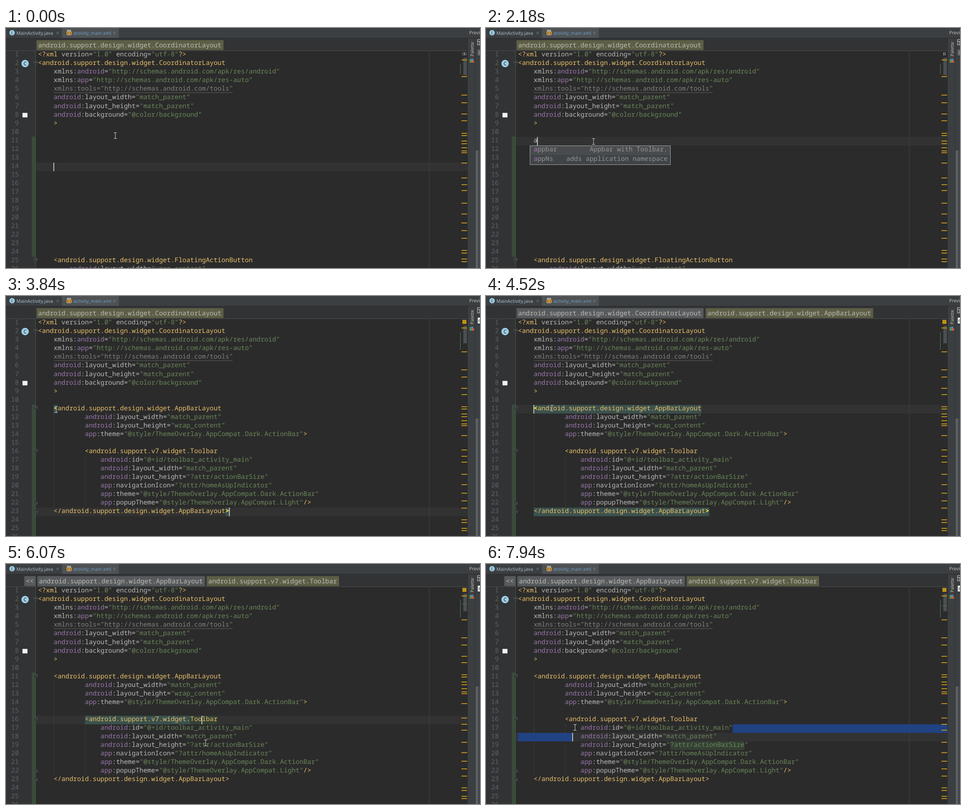
An HTML page with a canvas for the animation above (8000 ms loop, 1050 by 533 pixels).

```html
<!DOCTYPE html>
<html lang="en">
<head>
<meta charset="utf-8">
<title>Editor live template</title>
<style>
  html, body { margin: 0; width: 100%; height: 100%; overflow: hidden; background: #2b2b2b; }
  canvas { display: block; }
</style>
</head>
<body>
<canvas id="stage" width="1050" height="533"></canvas>
<script>
const ctx = document.getElementById('stage').getContext('2d');
const W = 1050, H = 533, LOOP = 8000;
const LEFT = 71, TOP = 51, CELL = 8.645, ROW = 19.05, BASE = 12.2;
const MONO = '14.41px "Noto Sans Mono", monospace';
const UI = '10.4px "Noto Sans", sans-serif';
const SIDE = '9.8px "Noto Sans", sans-serif';
const TAG = '#e8bf6a', NS = '#9876aa', ATTR = '#bababa', STR = '#6a8759', DIM = '#808080';
const TEAL = '#3b514d', USAGE = '#344134', YELLOW = '#be9117';

const head = [
  '<?xml version="1.0" encoding="utf-8"?>',
  '<android.support.design.widget.CoordinatorLayout',
  '    xmlns:android="http://schemas.android.com/apk/res/android"',
  '    xmlns:app="http://schemas.android.com/apk/res-auto"',
  '    xmlns:tools="http://schemas.android.com/tools"',
  '    android:layout_width="match_parent"',
  '    android:layout_height="match_parent"',
  '    android:background="@color/background"',
  '    >',
  ''
];
const before = [...head, ...Array(14).fill(''),
  '    <android.support.design.widget.FloatingActionButton',
  '        android:layout_width="wrap_content"'
];
const after = [...head,
  '    <android.support.design.widget.AppBarLayout',
  '            android:layout_width="match_parent"',
  '            android:layout_height="wrap_content"',
  '            app:theme="@style/ThemeOverlay.AppCompat.Dark.ActionBar">',
  '',
  '            <android.support.v7.widget.Toolbar',
  '                android:id="@+id/toolbar_activity_main"',
  '                android:layout_width="match_parent"',
  '                android:layout_height="?attr/actionBarSize"',
  '                app:navigationIcon="?attr/homeAsUpIndicator"',
  '                app:theme="@style/ThemeOverlay.AppCompat.Dark.ActionBar"',
  '                app:popupTheme="@style/ThemeOverlay.AppCompat.Light"/>',
  '    </android.support.design.widget.AppBarLayout>'
];

const INSERT = 2770, FOLDS = 3400;
const carets = [[0, 14, 4], [120, 10, 0], [1130, 11, 4], [2000, 11, 5], [INSERT, 23, 49],
  [4100, 11, 4], [5590, 16, 42], [6610, 19, 43], [6790, 18, 16], [7090, 18, 14]];
const statuses = [[0, 'eye'], [190, 'ok'], [2000, 'pause'], [2830, 'eye'], [FOLDS, 'ok']];
const mouse = [[0, 242, 239], [580, 241, 239], [950, 241, 239], [1130, 238, 252], [3100, 238, 252],
  [3240, 238, 265], [3880, 102, 251], [3920, 101, 251], [4100, 101, 251], [4520, 146, 249],
  [4880, 152, 249], [5060, 152, 249], [5590, 434, 345], [5830, 434, 347], [6070, 442, 397],
  [6610, 442, 405], [6670, 440, 405], [6910, 201, 389], [7210, 193, 379], [7490, 193, 378],
  [7550, 193, 376], [7760, 193, 375], [7940, 197, 363]];
const marks = [108, 149, 166, 191, 206, 234, 239, 251, 257, 266, 273, 277, 300, 333, 348,
  361, 389, 413, 433, 450, 467, 494, 500, 513, 519];

const rowY = r => TOP + (r - 1) * ROW;
const colX = c => LEFT + c * CELL;
const at = (list, t) => list.filter(e => e[0] <= t).pop();

function rect(x, y, w, h, color) {
  ctx.fillStyle = color;
  ctx.fillRect(x, y, w, h);
}
function line(points, color, width = 1) {
  ctx.strokeStyle = color;
  ctx.lineWidth = width;
  ctx.beginPath();
  points.forEach(([x, y]) => ctx.lineTo(x, y));
  ctx.stroke();
}
function text(str, x, y, color, font = MONO, align = 'left') {
  ctx.font = font;
  ctx.textAlign = align;
  ctx.fillStyle = color;
  ctx.fillText(str, x, y);
}
function disc(x, y, r, color) {
  ctx.fillStyle = color;
  ctx.beginPath();
  ctx.arc(x, y, r, 0, 7);
  ctx.fill();
}
function cells(row, from, to, color) {
  rect(colX(from), Math.round(rowY(row)), (to - from) * CELL, 19, color);
}

function tokenColor(s, prev, next) {
  if (s[0] === '"') return STR;
  if (/^[<>?/]/.test(s)) return TAG;
  const prefix = next === ':' && s !== 'xmlns';
  return prefix || prev.endsWith('xmlns:') ? NS : ATTR;
}

function codeLine(str, row) {
  const token = /"[^"]*"|<\?xml|\?>|<\/?[\w.]+|\/?>|\w+|[:=]/g;
  for (const { 0: s, index } of str.matchAll(token)) {
    const color = tokenColor(s, str.slice(0, index), str[index + s.length]);
    text(s, colX(index), rowY(row) + BASE, row === 5 ? DIM : color);
  }
}

function classIcon(x, y, r) {
  disc(x, y, r, '#9fd0e6');
  text('C', x, y + r * 0.5, '#2f4652', `600 ${r * 1.38}px "Open Sans", sans-serif`, 'center');
}

function cross(x, y) {
  line([[x - 2.5, y - 2.5], [x + 2.5, y + 2.5]], '#85888a');
  line([[x - 2.5, y + 2.5], [x + 2.5, y - 2.5]], '#85888a');
}

function tabs() {
  rect(0, 0, W, 23, '#3c3f41');
  rect(124, 0, 126, 22, '#4e5254');
  rect(0, 22, W, 1, '#2a2c2d');
  classIcon(13.5, 10.5, 6);
  text('MainActivity.java', 23, 14.5, '#a8bccd', UI);
  cross(114.5, 11);
  rect(135, 4, 9, 12, '#a5a49c');
  rect(134, 8, 12, 7, '#c8923f');
  line([[138, 9.5], [136, 11.5], [138, 13.5]], '#3a3325');
  line([[142, 9.5], [144, 11.5], [142, 13.5]], '#3a3325');
  text('activity_main.xml', 149, 14.5, '#6d9fc8', UI);
  cross(240, 11);
}

function crumb(str, x, active) {
  const w = str.length * CELL;
  rect(x - 3.5, 27, w + 8, 22, active ? '#5d5e45' : '#585b5d');
  text(str, x, 43, '#bcbcb6');
}

function breadcrumbs(t) {
  rect(0, 23, 1022, 27, '#313335');
  rect(0, 50, 1022, 1, '#4a4c4e');
  const base = 'android.support.design.widget.';
  if (t >= 5890) {
    crumb('<<', 44, false);
    crumb(base + 'AppBarLayout', 73, false);
    crumb('android.support.v7.widget.Toolbar', 448, true);
  } else if (t >= 4340) {
    crumb(base + 'CoordinatorLayout', 71, false);
    crumb(base + 'AppBarLayout', 490, true);
  } else crumb(base + 'CoordinatorLayout', 71, true);
}

function fold(row, end) {
  const y = rowY(row) + 7.5, d = end ? -1 : 1;
  ctx.fillStyle = '#2f3132';
  line([[61.5, y - 4 * d], [69.5, y - 4 * d], [69.5, y + d], [65.5, y + 4.5 * d],
    [61.5, y + d], [61.5, y - 4 * d]], '#6b6e70');
  ctx.fill();
  line([[63.5, y - d], [67.5, y - d]], '#85888a');
}

function gutter(t) {
  rect(0, 51, 65, H, '#313335');
  rect(57, 241, 8, t < INSERT ? 267 : H, '#384c38');
  if (t >= INSERT && t < FOLDS) rect(57, 241, 1, 248, '#54766a');
  rect(65, 51, 1, H, '#505254');
  for (let r = 1; r <= 26; r++) text(r, 28.5, rowY(r) + BASE, '#606366', MONO, 'right');
  classIcon(42.3, 79, 8.2);
  rect(36.5, 188.5, 11, 10, '#f2f2f2');
  fold(2);
  if (t < INSERT) fold(25);
  else if (t >= FOLDS) {
    fold(11); fold(16); fold(22, true); fold(23, true);
  }
}

function highlights(t, row) {
  rect(66, Math.round(rowY(row)), 956, 19, '#323232');
  rect(937, 51, 1, H, '#414141');
  if (t >= INSERT) {
    rect(106, 260, 1, 209, '#3b3b3b');
    rect(175, 355, 1, 114, '#3b3b3b');
  }
  if (t >= 2890 && t < 4280) {
    cells(11, 4, 5, TEAL);
    cells(23, 48, 49, TEAL);
  } else if (t >= 4280 && t < 5590) {
    cells(11, 4, 47, TEAL);
    cells(23, 4, 49, TEAL);
  } else if (t >= 5650 && t < 6670) {
    cells(16, 12, 39, TEAL);
    cells(16, 39, 46, USAGE);
  }
  if (t >= 6730) cells(19, 39, 58, USAGE);
  if (t >= 6790) {
    rect(colX(55), 356, 1022 - colX(55), 19, '#214283');
    cells(18, 0, t < 7090 ? 16 : 14, '#214283');
  }
}

function code(t) {
  (t < INSERT ? before : after).forEach((s, i) => codeLine(s, i + 1));
  if (t >= 2000 && t < INSERT) text('a', colX(4), rowY(11) + BASE, ATTR);
  if (t >= 2890 && t < 5590) {
    const bold = 'bold ' + MONO;
    text('<', colX(4), rowY(11) + BASE, '#ffef28', bold);
    text('>', colX(48), rowY(23) + BASE, '#ffef28', bold);
  }
  const wave = [];
  for (let x = 106; x <= 503; x += 2) wave.push([x, x % 4 ? 144.5 : 142.5]);
  line(wave, '#6e6e6e', 0.9);
}

function popup() {
  rect(97, 261, 312, 43, '#a2a4a5');
  rect(98, 262, 310, 41, '#414446');
  rect(98, 262, 310, 20, '#494c4e');
  [['ppbar', 'Appbar with Toolbar.', 274.3], ['ppNs', 'adds application namespace', 295]]
    .forEach(([name, note, y]) => {
      text('a', colX(4), y, '#b073b8');
      text(name, colX(5), y, '#929496');
      text(note, 402.5, y, '#929496', MONO, 'right');
    });
}

function status(kind) {
  if (kind === 'ok') rect(1011, 53, 9, 9, YELLOW);
  else if (kind === 'pause') {
    rect(1013, 54, 1.5, 7, '#9a9c9e');
    rect(1016.5, 54, 1.5, 7, '#9a9c9e');
  } else {
    ctx.strokeStyle = '#909294';
    ctx.lineWidth = 1;
    ctx.beginPath();
    ctx.ellipse(1015.5, 57.5, 5, 3.2, 0, 0, 7);
    ctx.stroke();
    disc(1015.5, 57.5, 1.7, '#a0a2a4');
  }
}

function stripe(t) {
  const grown = t >= INSERT;
  const mark = y => rect(1009, Math.round(y) - 1, 12.5, 2, YELLOW);
  rect(1013, 66, 8, 39, '#4c4e4f');
  rect(1006, 80, 1, grown ? 39 : 22, '#4f7a5a');
  mark(71);
  marks.forEach(y => mark(grown ? 163 + 0.966 * (y - 148) : y));
  if (t >= 5650) rect(1009, t < 6730 ? 88 : 92, 12.5, 1, '#3f7a45');
  status(at(statuses, t)[1]);
}

function sidebar(t) {
  rect(1022, 0, 28, H, '#3c3f41');
  rect(1022, 22, 28, 1, '#2a2c2d');
  rect(1022, 23, 1, H, '#2c2e2f');
  rect(1039, 23, 1, H, '#2f3233');
  text('Previ', 1026, 14, '#bbbbbb', UI);
  ctx.save();
  ctx.translate(1035.5, 63);
  ctx.rotate(-Math.PI / 2);
  text('Palette', 0, 0, '#bbbbbb', SIDE);
  ctx.restore();
  rect(1027, 69, 4, 8, '#4a9a4d');
  rect(1031, 68, 4, 4, '#4a86c0');
  rect(1031, 72, 6, 5, '#c9574a');
  ctx.strokeStyle = '#c4c6c8';
  ctx.lineWidth = 1;
  ctx.strokeRect(1044.5, 25.5, 10, 12);
  line([[1044, 29.5], [W, 29.5]], '#c4c6c8');
  line([[1048.5, 29], [1048.5, 38]], '#c4c6c8');
  rect(1040, 44, 10, 1, '#323435');
  rect(1045, 48, 5, 13, t < INSERT ? '#66696b' : '#e6e6e6');
  line([[W, 52], [1047, 55], [W, 58]], t < INSERT ? '#a4a6a8' : '#222222');
  rect(1040, 64, 10, 1, '#323435');
  rect(1040, 272, 6, H, '#535658');
  for (let y = 273; y < H; y += 3) rect(1041, y, 4, 1, '#76797b');
  rect(1046, 272, 4, H, '#434648');
}

// The pointer is sampled every 60 ms along each segment.
function pointer(t) {
  const i = mouse.indexOf(at(mouse, t));
  const [t0, x0, y0] = mouse[i], [t1, x1, y1] = mouse[i + 1] || mouse[i];
  const step = Math.floor((t - t0) / 60) * 60;
  const k = t1 > t0 ? step / (t1 - t0) : 0;
  const x = Math.round(x0 + (x1 - x0) * k) + 0.2;
  const y = Math.round(y0 + (y1 - y0) * k);
  const beam = (color, width) => {
    line([[x, y - 6], [x, y + 6]], color, width);
    for (const d of [-1, 1]) {
      line([[x - 3.5, y + 6.5 * d], [x - 1, y + 6.5 * d], [x, y + 5.5 * d],
        [x + 1, y + 6.5 * d], [x + 3.5, y + 6.5 * d]], color, width);
    }
  };
  beam('#1d1d1d', 2.2);
  beam('#d4d4d4', 1.1);
}

function draw(t) {
  const [, row, col] = at(carets, t);
  rect(0, 0, W, H, '#2b2b2b');
  highlights(t, row);
  gutter(t);
  code(t);
  rect(Math.round(colX(col)) - 1, Math.round(rowY(row)), 1.7, 19, '#d0d0d0');
  if (t >= 2100 && t < INSERT) popup();
  stripe(t);
  breadcrumbs(t);
  tabs();
  sidebar(t);
  pointer(t);
}

ctx.textBaseline = 'alphabetic';
ctx.textRendering = 'geometricPrecision';
const start = performance.now();
function tick() {
  draw((performance.now() - start) % LOOP);
  requestAnimationFrame(tick);
}
tick();
</script>
</body>
</html>
```
